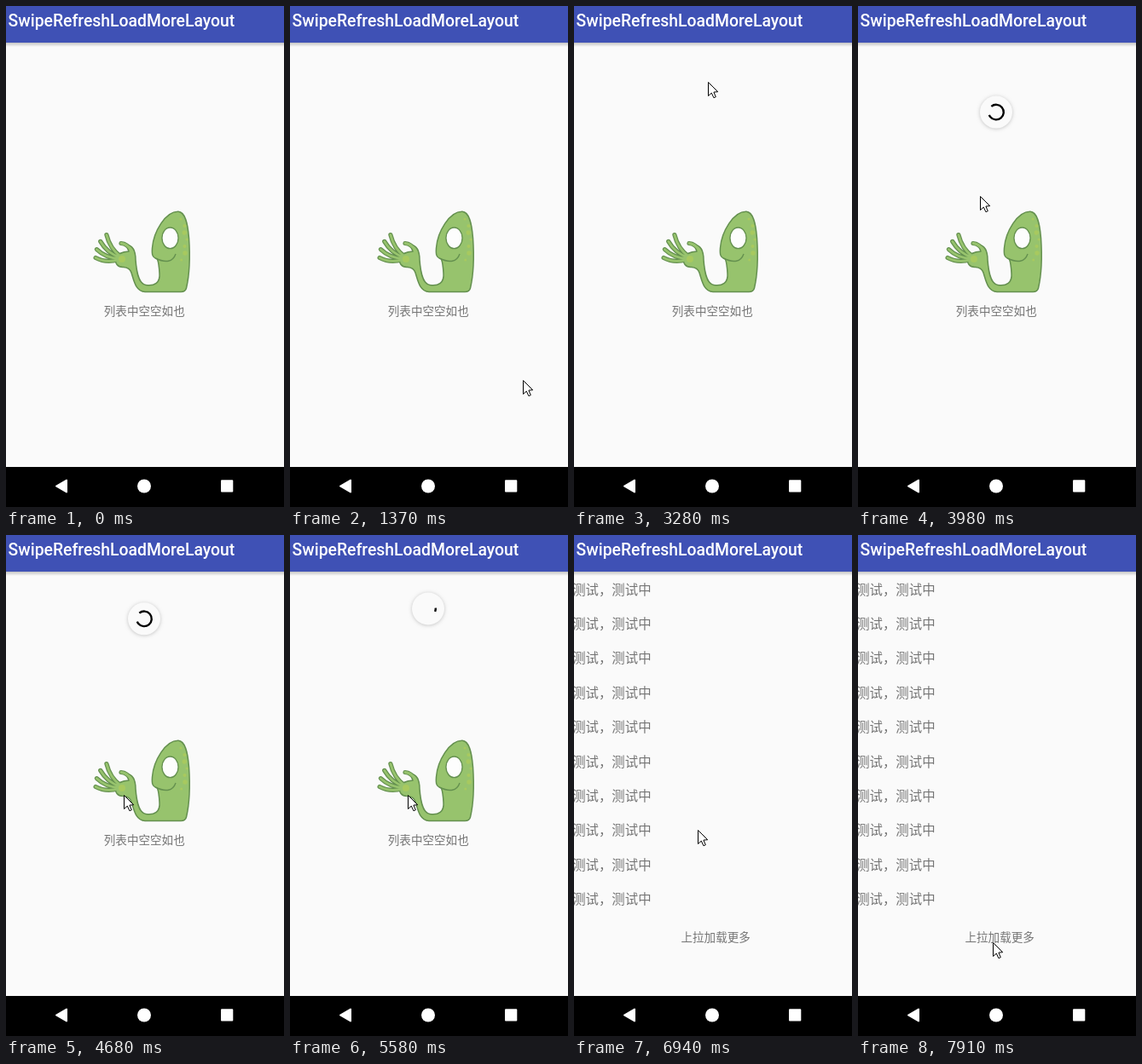
These frames come from a looping animation (326 by 588 pixels, 8 s). An HTML page with a canvas:

```html
<!DOCTYPE html>
<html lang="zh-CN">
<head>
<meta charset="utf-8">
<title>SwipeRefreshLoadMoreLayout</title>
<style>
html, body { margin: 0; width: 100%; height: 100%; overflow: hidden; background: #fafafa; }
canvas { display: block; width: 326px; height: 588px; }
</style>
</head>
<body>
<canvas id="stage"></canvas>
<script>
const W = 326, H = 588, LOOP = 8000;
const LIST_AT = 6670, FOOTER_AT = 6820;
const STEP = 135.6, STEP_ORIGIN = 2305; // the screen refreshes in steps
const CJK = '"Noto Sans CJK SC", "Noto Sans CJK", sans-serif';
const GREEN = '#97c36d', EDGE = '#64904f', GRAY = '#757575', TAU = Math.PI * 2;

const canvas = document.getElementById('stage');
const ctx = canvas.getContext('2d');
const dpr = window.devicePixelRatio || 1;
canvas.width = W * dpr;
canvas.height = H * dpr;

// Turning points of the pointer: step, x, y.
const turns = [
  [-7, 273, 439], [-5, 172, 314], [-1, 172, 314], [0, 175, 298],
  [1, 189, 221], [4, 185, 194], [7, 157, 89], [9, 151, 71],
  [14, 138, 305], [29, 138, 305], [32, 145, 346], [36, 145, 346],
  [39, 148, 488], [41, 158, 478]
];

const clamp = x => Math.min(1, Math.max(0, x));
const mix = (a, b, p) => a + (b - a) * p;
const smooth = x => x * x * (3 - 2 * x);

// cubic-bezier(.4, 0, .2, 1)
function ease(x) {
  let lo = 0, hi = 1;
  for (let i = 0; i < 20; i++) {
    const s = (lo + hi) / 2, r = 1 - s;
    if (1.2 * r * r * s + 0.6 * r * s * s + s * s * s < x) lo = s; else hi = s;
  }
  return smooth(lo);
}

function text(str, x, y, font, color) {
  ctx.font = font;
  ctx.fillStyle = color;
  ctx.fillText(str, x, y);
}

function rect(y, h, color) {
  ctx.fillStyle = color;
  ctx.fillRect(0, y, W, h);
}

function disc(x, y, r, color) {
  ctx.fillStyle = color;
  ctx.beginPath();
  ctx.arc(x, y, r, 0, TAU);
  ctx.fill();
}

function shape(path, fill, edge, width, join = 'round') {
  ctx.lineWidth = width;
  ctx.lineJoin = join;
  ctx.strokeStyle = edge;
  ctx.fillStyle = fill;
  ctx.fill(path);
  ctx.stroke(path);
}

const body = new Path2D(
  'M202 241.3C210 242 213 254 214.5 272C216 294 215 316 211.5 331' +
  'Q210.5 335.5 205 335.5H163C152 335 150 322 147 313Q145 307 138 306.5' +
  'C131 307 127 302 129 295Q132 289 144 288L141 280' +
  'C150 281 152 289 152 298C153 311 155 326 164 327.5' +
  'C174 329 181 325 180 314Q179.5 303 177.5 297C171 295 171 291 171.5 284' +
  'C173 265 187 241 202 241.3Z');
const eye = new Path2D();
eye.ellipse(192.5, 272.3, 9.6, 12.3, 0, 0, TAU);
const mouth = new Path2D('M175 296Q194 305 199 291');
const hand = new Path2D('M147 287Q142 279 135 278.5');
for (let i = 0; i < 4; i++) {
  const a = (57 - 17.5 * i) * Math.PI / 180;
  const at = (r, angle) => [137 - r * Math.cos(angle), 298 - r * Math.sin(angle)];
  hand.moveTo(...at(5, a));
  hand.quadraticCurveTo(...at(20, a - 0.28), ...at(35 - i, a));
}
const arrow = new Path2D('M0 0V16L3.8 12.6L6.4 18.2L8.8 17.2L6.4 11.6L11.2 11.2Z');
const back = new Path2D('M59 563.5L71 556.5V570.5Z');
const square = new Path2D('M253 557.3H265.3V569.6H253Z');

function strokeHand(color, width) {
  ctx.strokeStyle = color;
  ctx.lineWidth = width;
  ctx.lineCap = 'round';
  ctx.stroke(hand);
  ctx.lineCap = 'butt';
}

function drawCreature() {
  strokeHand(EDGE, 5.2);
  shape(body, GREEN, EDGE, 1.5);
  strokeHand(GREEN, 2.8);
  disc(136, 297, 4, '#a8c95f');
  for (let i = 0; i < 7; i++) {
    disc(205 + 5 * Math.sin(i / 2) + i % 2 * 2, 250 + 8 * i, 1.5 + i % 3 * 0.6, '#a8c95f');
  }
  shape(eye, '#fdfdfd', EDGE, 1.4);
  ctx.stroke(mouth);
}

// Pulled down by the drag, then springs back to rest.
function spinnerY(step) {
  const pulled = mix(26, 149, smooth(clamp((step - 10) / 2.8)));
  return mix(pulled, 86.5, 1 - (1 - clamp((step - 16) / 2)) ** 2.4);
}

// Trailing and leading angle of the arc, in degrees.
function arcAngles(t, y) {
  if (t < 4800) return [-130, -130 + 288 * Math.min(1, (y - 26) / 60)];
  if (t < 5466) {
    const p = (t - 4800) / 666, lead = mix(158, 350, p);
    return [lead - mix(288, 12, p), lead];
  }
  const f = (t - 5466) / 1332, base = 350 + 234 * f;
  return [
    base - 12 + 288 * ease(clamp(2 * f - 1)),
    base + 288 * ease(clamp(2 * f))
  ];
}

function drawSpinner(t, step) {
  if (step < 11 || t >= FOOTER_AT) return;
  const y = spinnerY(step);
  const [from, to] = arcAngles(STEP_ORIGIN + STEP * step, y).map(a => a * Math.PI / 180);
  ctx.save();
  ctx.translate(162, y);
  if (t >= LIST_AT) ctx.scale(0.45, 0.45);
  ctx.save();
  ctx.shadowColor = 'rgba(0,0,0,.22)';
  ctx.shadowBlur = 4 * dpr;
  ctx.shadowOffsetY = 0.6 * dpr;
  disc(0, 0, 19, '#fafafa');
  ctx.restore();
  ctx.globalAlpha = y < 86 ? 0.5 : 1;
  ctx.strokeStyle = '#000';
  ctx.lineWidth = 2.4;
  ctx.beginPath();
  ctx.arc(0, 0, 8.8, from, to);
  ctx.stroke();
  ctx.restore();
}

function drawContent(t) {
  if (t < LIST_AT) {
    drawCreature();
    text('列表中空空如也', 114.8, 363.2, '13.57px ' + CJK, GRAY);
    return;
  }
  for (let i = 0; i < 10; i++) {
    text('测试，测试中', -1.8, 69.6 + 40.4 * i, '15.4px ' + CJK, GRAY);
  }
  if (t >= FOOTER_AT) text('上拉加载更多', 125.5, 476.8, '13.57px ' + CJK, GRAY);
}

function drawBars() {
  const shade = ctx.createLinearGradient(0, 43, 0, 48);
  shade.addColorStop(0, 'rgba(0,0,0,.22)');
  shade.addColorStop(1, 'rgba(0,0,0,0)');
  rect(43, 5, shade);
  rect(0, 43, '#3f51b5');
  text('SwipeRefreshLoadMoreLayout', 2.6, 23.7, '500 19.38px Roboto, sans-serif', '#fff');

  rect(541, 47, '#000');
  shape(back, '#fff', '#fff', 2);
  disc(162, 563.5, 8, '#fff');
  shape(square, '#fff', '#fff', 2);
}

function drawPointer(step) {
  const next = turns.findIndex(k => k[0] > step);
  if (next === 0) return;
  const b = turns[next] || turns[turns.length - 1];
  const a = next > 0 ? turns[next - 1] : b;
  const p = a === b ? 0 : smooth((step - a[0]) / (b[0] - a[0]));
  ctx.save();
  ctx.translate(Math.round(mix(a[1], b[1], p)) + 0.5, Math.round(mix(a[2], b[2], p)) + 0.5);
  shape(arrow, '#fff', '#000', 1, 'miter');
  ctx.restore();
}

function draw(t) {
  const step = Math.floor((t - STEP_ORIGIN) / STEP);
  ctx.setTransform(dpr, 0, 0, dpr, 0, 0);
  rect(0, H, '#fafafa');
  drawContent(t);
  drawSpinner(t, step);
  drawBars();
  drawPointer(step);
}

const start = performance.now();
function loop() {
  draw((performance.now() - start) % LOOP);
  requestAnimationFrame(loop);
}
loop();
</script>
</body>
</html>
```
